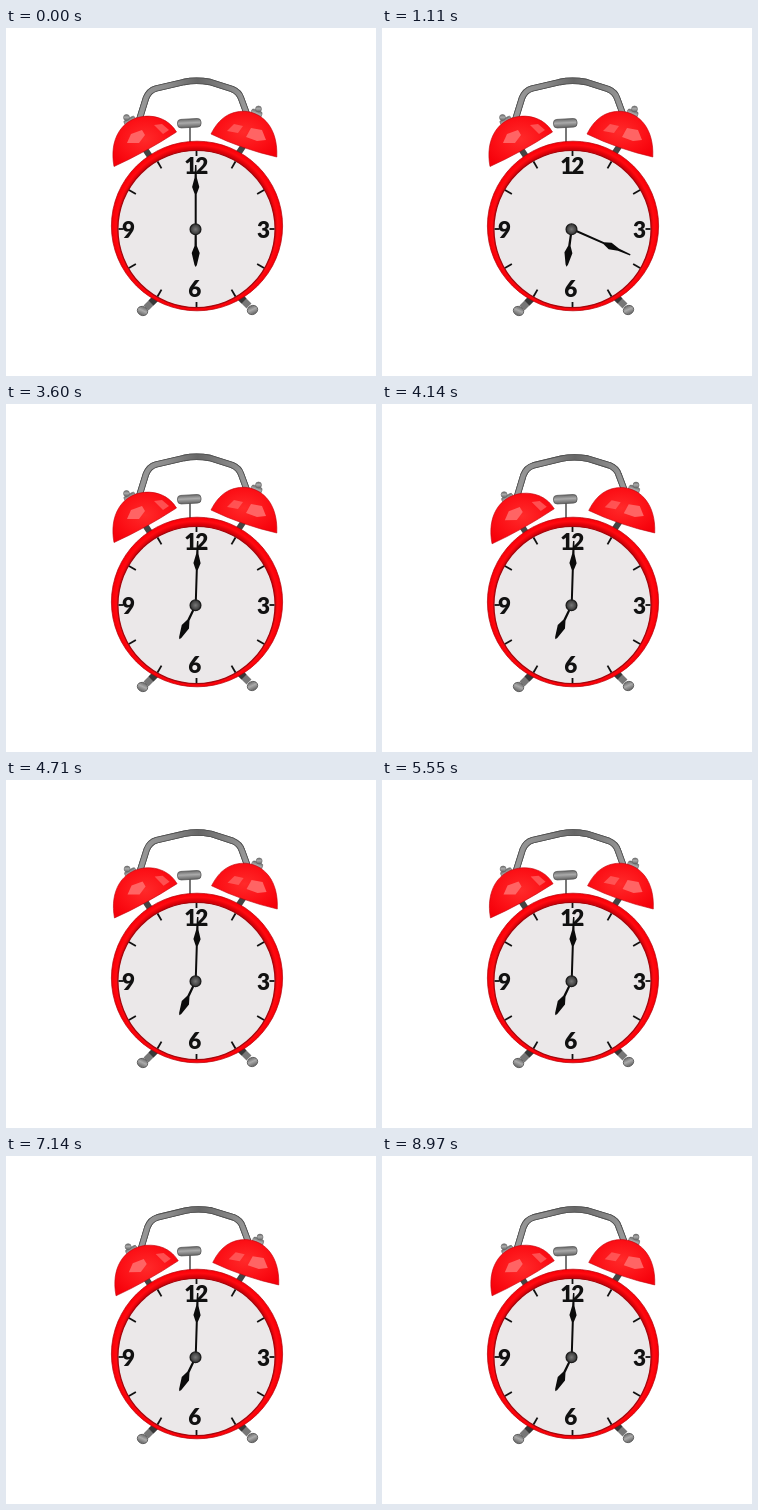
An HTML page for the animation above (9.07 s loop, 370x348 px).

```html
<!DOCTYPE html>
<html lang="en">
<head>
<meta charset="utf-8">
<title>Alarm clock</title>
<style>
html, body { margin: 0; width: 100%; height: 100%; overflow: hidden; background: #fff; }
svg { display: block; width: 370px; height: 348px; }
text { font: 900 22.5px Lato, "Open Sans", sans-serif; text-anchor: middle; fill: #111; }
</style>
</head>
<body>
<svg viewBox="0 0 370 348">
  <defs>
    <linearGradient id="steel" x2="0" y2="1">
      <stop stop-color="#6b6b6b"/><stop offset=".45" stop-color="#aaa"/><stop offset="1" stop-color="#646464"/>
    </linearGradient>
    <linearGradient id="bar" gradientUnits="userSpaceOnUse" x1="130" y1="0" x2="242" y2="0">
      <stop stop-color="#999"/><stop offset=".3" stop-color="#8a8a8a"/>
      <stop offset=".55" stop-color="#666"/><stop offset="1" stop-color="#999"/>
    </linearGradient>
    <radialGradient id="bell" cx=".5" cy=".45" r=".65">
      <stop stop-color="#ff2a2a"/><stop offset=".6" stop-color="#fc1016"/><stop offset="1" stop-color="#f5000a"/>
    </radialGradient>
    <radialGradient id="rim" gradientUnits="userSpaceOnUse" cx="191" cy="198" r="86">
      <stop offset=".9" stop-color="#d80008"/><stop offset=".94" stop-color="#ff0a10"/>
      <stop offset=".98" stop-color="#fb0008"/><stop offset="1" stop-color="#d40008"/>
    </radialGradient>
    <radialGradient id="hub"><stop stop-color="#777"/><stop offset="1" stop-color="#333"/></radialGradient>
  </defs>

  <!-- legs, posts and hammer -->
  <g fill="none" stroke-width="7">
    <path d="M154 266L140 280M229 264L243 278" stroke="#777"/>
    <path d="M154 266L145 275M229 264L238 273" stroke="#383838"/>
    <path d="M139 121L145 130M238 117L232 126" stroke="#444" stroke-width="6"/>
    <path d="M184 99V115" stroke="#777" stroke-width="2"/>
  </g>
  <g fill="url(#steel)" stroke="#555" stroke-width=".8">
    <ellipse cx="136.500" cy="283" rx="5.300" ry="4.500" transform="rotate(25 136.500 283)"/>
    <ellipse cx="246.500" cy="282" rx="5.300" ry="4.500" transform="rotate(-25 246.500 282)"/>
    <rect x="171.500" y="91" width="23.500" height="8.500" rx="3.500" transform="rotate(-3 183 95)"/>
  </g>

  <g id="top">
    <g fill="none" stroke-linejoin="round">
      <path id="handle" d="M133.500 91L140 70Q143 62.500 150 60.500L178 54Q190 51.500 204 54L226 61Q233 64 235 70L240.500 85" stroke="#505050" stroke-width="6.400"/>
      <use href="#handle"/>
      <path d="M133.500 91L140 70Q143 62.500 150 60.500L178 54Q190 51.500 204 54L226 61Q233 64 235 70L240.500 85" stroke="url(#bar)" stroke-width="4.800"/>
    </g>
    <g fill="url(#steel)" stroke="#666" stroke-width=".6">
      <rect x="118" y="90" width="12" height="7" rx="2" transform="rotate(-28 124 93)"/>
      <circle cx="120.500" cy="89.500" r="3"/>
      <rect x="245" y="82" width="11" height="7" rx="2" transform="rotate(20 250 85)"/>
      <circle cx="252.500" cy="81" r="3"/>
    </g>
    <g fill="url(#bell)" stroke="#c0000a" stroke-width=".6">
      <path d="M108 138.500C103 112 115 91 138 88.300C152 87 164 93 170.500 104Q138 125 108 138.500Z"/>
      <path d="M205 106C213 90 224 83 239 83.300C258 85 272 101 270.800 129Q236 121 205 106Z"/>
    </g>
    <g fill="#ff6464">
      <path d="M121 115L125 106L136 102L139 107L133 115Z"/>
      <path d="M148 97L156 96L163 102L157 106Z" opacity=".75"/>
      <path d="M221 103L228 96L237 98L232 105Z" opacity=".75"/>
      <path d="M240 109L245 100L256 102L260 112L251 113Z"/>
    </g>
  </g>

  <ellipse cx="191" cy="198" rx="85.600" ry="84.800" fill="url(#rim)" stroke="#b80008" stroke-width=".7"/>
  <circle cx="190.500" cy="201" r="78.600" fill="#ebe8e9" stroke="#a5060c" stroke-width="1.300"/>
  <g id="ticks" stroke="#111" stroke-width="1.800"></g>
  <text x="189.300" y="146.300" letter-spacing="-2">12</text>
  <text x="257.500" y="209.500">3</text>
  <text x="188.700" y="269">6</text>
  <text x="122.500" y="209.500">9</text>
  <g fill="#0b0b0b">
    <path id="hour" d="M-1 0L-1.200-17L-4-24L-1.200-36L0-38L1.200-36L4-24L1.200-17L1 0Z"/>
    <path id="minute" d="M-1 0L-1-35L-3.600-42L-1.200-51L-.7-64H.7L1.200-51L3.600-42L1-35L1 0Z"/>
  </g>
  <circle cx="189.500" cy="201.300" r="5.400" fill="url(#hub)" stroke="#1c1c1c" stroke-width="1.300"/>
</svg>
<script>
const STEP = 30, LOOP = 9070, LAST = 299, RING = 122;
const $ = id => document.getElementById(id);
const set = (id, value) => $(id).setAttribute('transform', value);
const turn = (id, angle) => set(id, `translate(189.7 201) rotate(${angle})`);

$('ticks').innerHTML = Array.from({ length: 12 }, (_, i) =>
  `<path d="M0-78V${i % 3 ? -70 : -73}" transform="translate(190.5 201) rotate(${i * 30})"/>`).join('');

function draw(now) {
  const k = Math.min(LAST, Math.floor(now % LOOP / STEP));
  const sweep = Math.min(k, 120);
  turn('minute', Math.min(sweep * 3.075, 361.8));
  turn('hour', 180 + sweep * .2125);

  // bells and handle rattle with a five-step cycle
  const c = Math.cos((k - RING - 1.5) * Math.PI * 2 / 5);
  set('top', k < RING ? '' : `translate(${.9 + c} ${.8 * c}) rotate(${-.6 * c} 188 100)`);
}

const start = performance.now();
function loop() {
  draw(performance.now() - start);
  requestAnimationFrame(loop);
}
loop();
</script>
</body>
</html>
```
